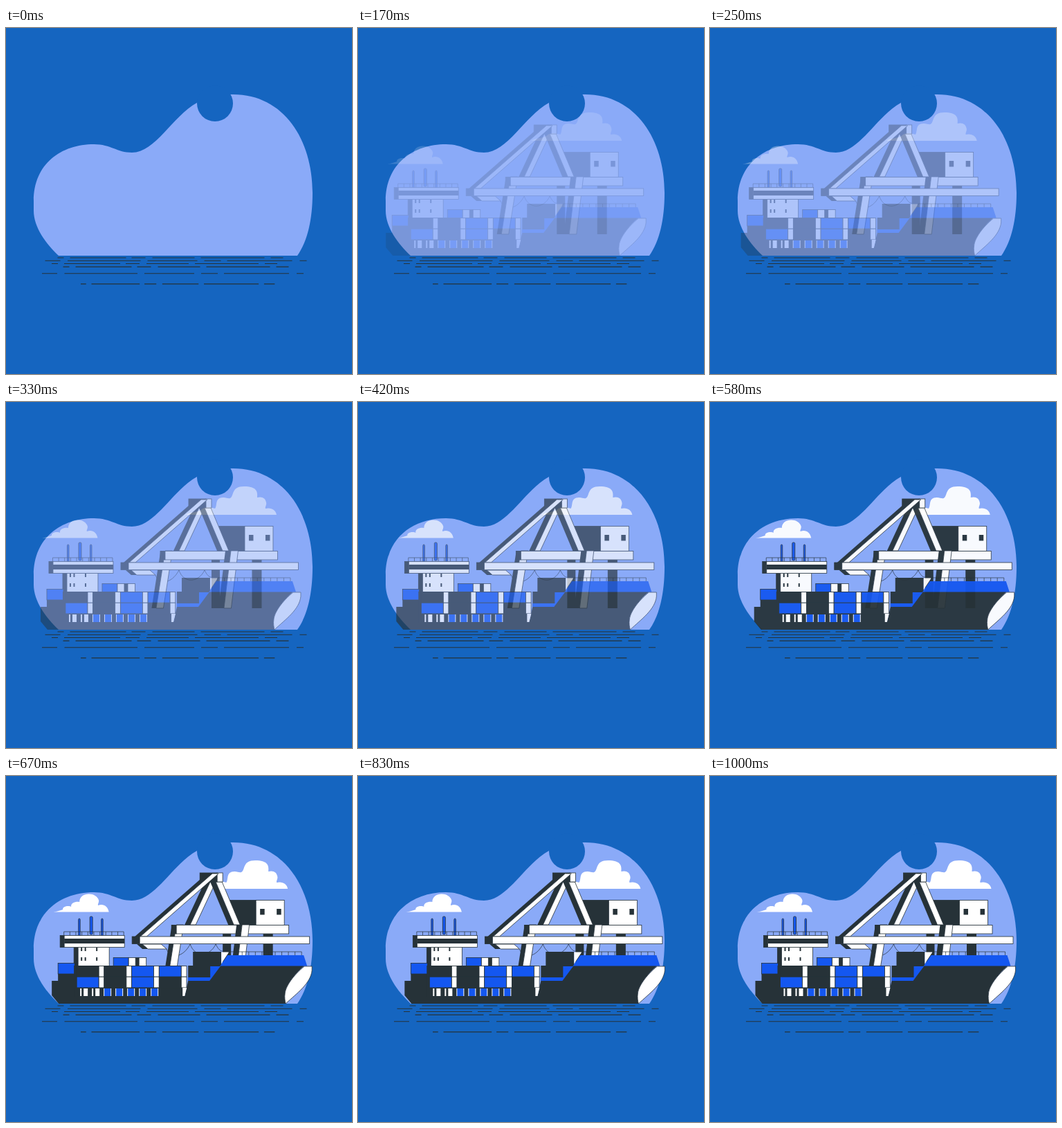
These frames come from a looping animation (500x500 px, 1040 ms). An HTML page:

```html
<!DOCTYPE html>
<html lang="en">
<head>
<meta charset="utf-8">
<title>Cargo ship</title>
<style>
  html, body { margin: 0; width: 100%; height: 100%; overflow: hidden; background: #1565c0; }
  svg { display: block; width: 100vw; height: 100vh; }
  .dark { fill: #263238; }
  .white { fill: #fff; }
  .blue { fill: #1457f0; }
  .edge { stroke: #263238; stroke-width: .8; }
  .line { fill: none; stroke: #263238; stroke-width: .7; }
  #water { fill: none; stroke: #263238; stroke-width: 1.15; }
</style>
</head>
<body>
<svg viewBox="0 0 500 500">
  <rect width="500" height="500" fill="#1565c0"/>
  <path fill="#8aaaf8" d="M76 329C58 312 40 288 40 264V250C40 196 80 168 127 168C152 168 160 180 182 180C216 180 240 128 276 108C290 98 308 96 328 96C402 96 443 162 443 238C443 276 436 308 421 329Z"/>
  <circle cx="302" cy="109" r="26" fill="#1565c0"/>
  <g id="water"></g>
  <g class="slide white">
    <path d="M68 196.500C74 196 78 194 82 193C81 188 91 187 94 189C93 183 101 181 106 182C106 167 131 167 134 180C134 184 132 185 133 187C140 184 147 188 148.500 196.500Z"/>
    <path d="M276 163C284 158 292 160 298 156C304 150 312 152 318 154C322 150 317 138 330 138C335 138 337 140 340 139C346 136 341 122 360 122C378 122 380 129 379 138C386 136 391 139 392 145C393 149 390 151 391 154C399 152 406 156 407 163Z"/>
  </g>
  <g class="slide" id="crane"></g>
  <g class="slide" id="ship"></g>
</svg>
<script>
const $ = id => document.getElementById(id);
const times = (n, fn) => Array.from({ length: n }, (_, i) => fn(i)).join('');
const rect = (cls, x, y, w, h) => `<rect class="${cls}" x="${x}" y="${y}" width="${w}" height="${h}"/>`;
const path = (cls, d) => `<path class="${cls}" d="${d}"/>`;

// a white front with a dark face on its left
const box = (x, y, w, h, depth) =>
  rect('dark edge', x - depth, y, depth, h) + rect('white edge', x, y, w, h);

// the same for a slanted bar from (x1, y1) to (x2, y2)
function beam(x1, y1, x2, y2, w, depth) {
  const face = (cls, dx, width) =>
    path(cls, `M${x1 + dx} ${y1}h${width}L${x2 + dx + width} ${y2}h${-width}Z`);
  return face('dark', -depth, depth) + face('white edge', 0, w);
}

function railing(x1, x2, y, posts) {
  const gap = (x2 - x1) / posts;
  return path('line', `M${x1} ${y}H${x2}` + times(posts + 1, i => `M${x1 + gap * i} ${y}v5`));
}

function drawWater() {
  const near = '9 9 81 8 20 10 61 9 92 9 18 999';
  const wide = '22 10.5 105.5 10 72 10 24 9 94 11 10 999';
  const row = (x, y, dashes, scale = 1) =>
    `<path d="M0 0h400" stroke-dasharray="${dashes}" transform="translate(${x} ${y}) scale(${scale} 1)"/>`;
  $('water').innerHTML =
    row(74.5, 332, near) + row(56.5, 336.2, wide) + row(66, 340.5, near) +
    row(82.5, 345.1, near) + row(52, 354.7, wide) + row(108, 369.9, near, .86);
}

function drawCrane() {
  $('crane').innerHTML = [
    rect('dark', 313, 226, 12, 72),
    rect('dark', 371.5, 226, 14, 72),
    path('line', 'M232 250C236 264 255 264 266 243C272 262 294 262 303 243C308 254 314 256 320 250'),
    // cabin
    box(361, 179.5, 41, 36, 39),
    times(2, i => rect('dark', 367 + 24 * i, 192, 6.5, 8.5)),
    // A-frame, head and boom
    beam(295, 153, 266, 215, 8, 8),
    beam(303, 153, 329, 215, 9, 8),
    box(305, 140, 8, 13, 25),
    beam(298, 141, 194, 232, 9, 8),
    // front legs and beams
    beam(246, 215, 233, 298, 10.5, 6.5),
    box(246, 215.5, 162.5, 12.5, 7),
    beam(341, 215, 331, 298, 10.5, 8),
    beam(197, 243, 205, 250, 27, 8),
    box(193, 232, 245.5, 10.5, 11)
  ].join('');
}

// four bays of containers, two rows high, with white ends between them
function containers() {
  const rows = ['dark dark blue blue', 'blue dark blue dark'].map(row => row.split(' '));
  const pitch = 39.7, width = 32;
  return rows.map((row, r) => row.map((cls, i) => {
    const x = 102 + pitch * i, y = 274.5 + 15.7 * r;
    return rect(cls + ' edge', x, y, width, 15.7) + rect('white edge', x + width, y, pitch - width, 15.7);
  }).join('')).join('');
}

function supports() {
  return times(7, i => {
    const x = 107 + 17 * i;
    return rect('white', x, 307, 2, 11) + rect('white', x + 5, 307, 6, 11) +
      (i > 1 ? rect('blue', x + 1, 307, 9, 11) : '');
  });
}

function drawShip() {
  const bow = 'C415 288 404 304 403 314C402 320 403 325 404 329';
  $('ship').innerHTML = [
    // bridge
    times(3, i => {
      const main = i === 1;
      return `<rect class="blue edge" x="${104.5 + 16.5 * i}" y="${main ? 203 : 206}" width="${main ? 4 : 2.5}" height="26" rx="1.5"/>`;
    }),
    railing(83.5, 170, 225, 10),
    box(104, 247, 45, 28, 6),
    times(2, r => [109, 114.5, 131].map(x => rect('dark', x - 1, 248 + 14 * r, 2, 5)).join('')),
    box(84, 230.5, 87, 17, 6),
    rect('dark', 84, 235, 87, 7),
    // hull
    path('dark', `M66 296H75V286H100V318H258L263 296V274H270V254H311V274H431${bow}H76L66 317Z`),
    // cargo
    rect('blue edge', 75, 270.5, 24, 15.5),
    rect('blue edge', 155, 262.5, 22, 12),
    box(192, 262.5, 10.5, 12, 5),
    rect('white edge', 177, 262.5, 10, 12),
    rect('dark', 98, 274, 160, 45),
    containers(),
    supports(),
    path('white', 'M255 306H261L258 318H255Z'),
    // deck and bow
    path('white', 'M311 254.5H322L311 271Z'),
    path('blue', 'M320 259H430L435 274.5H310L294 296H263V291H295V275H309Z'),
    railing(322, 427, 254, 11),
    path('white edge', `M442 275H431${bow}C420 314 440 300 442 281Z`)
  ].join('');
}

// cubic-bezier(.36, -.01, .5, 1.38)
function ease(x) {
  if (x >= 1) return 1;
  const curve = (s, a, b) => 3 * (1 - s) ** 2 * s * a + 3 * (1 - s) * s * s * b + s ** 3;
  let lo = 0, hi = 1;
  for (let i = 0; i < 30; i++) {
    const mid = (lo + hi) / 2;
    if (curve(mid, .36, .5) < x) lo = mid; else hi = mid;
  }
  return curve(lo, -.01, 1.38);
}

const LOOP = 1040, STEPS = 25, TRAVEL = 30, REST = -.5;
const sliders = document.querySelectorAll('.slide');

function render(ms) {
  const step = Math.floor((ms % LOOP) / LOOP * STEPS + .15);
  const progress = step < 2 ? 0 : ease((step + 1) / (STEPS - 1));
  for (const el of sliders) {
    el.setAttribute('transform', `translate(${REST + TRAVEL * (progress - 1)} 0)`);
    el.setAttribute('opacity', Math.min(1, progress));
  }
}

drawWater();
drawCrane();
drawShip();
const start = performance.now();
function tick() {
  render(performance.now() - start);
  requestAnimationFrame(tick);
}
tick();
</script>
</body>
</html>
```
